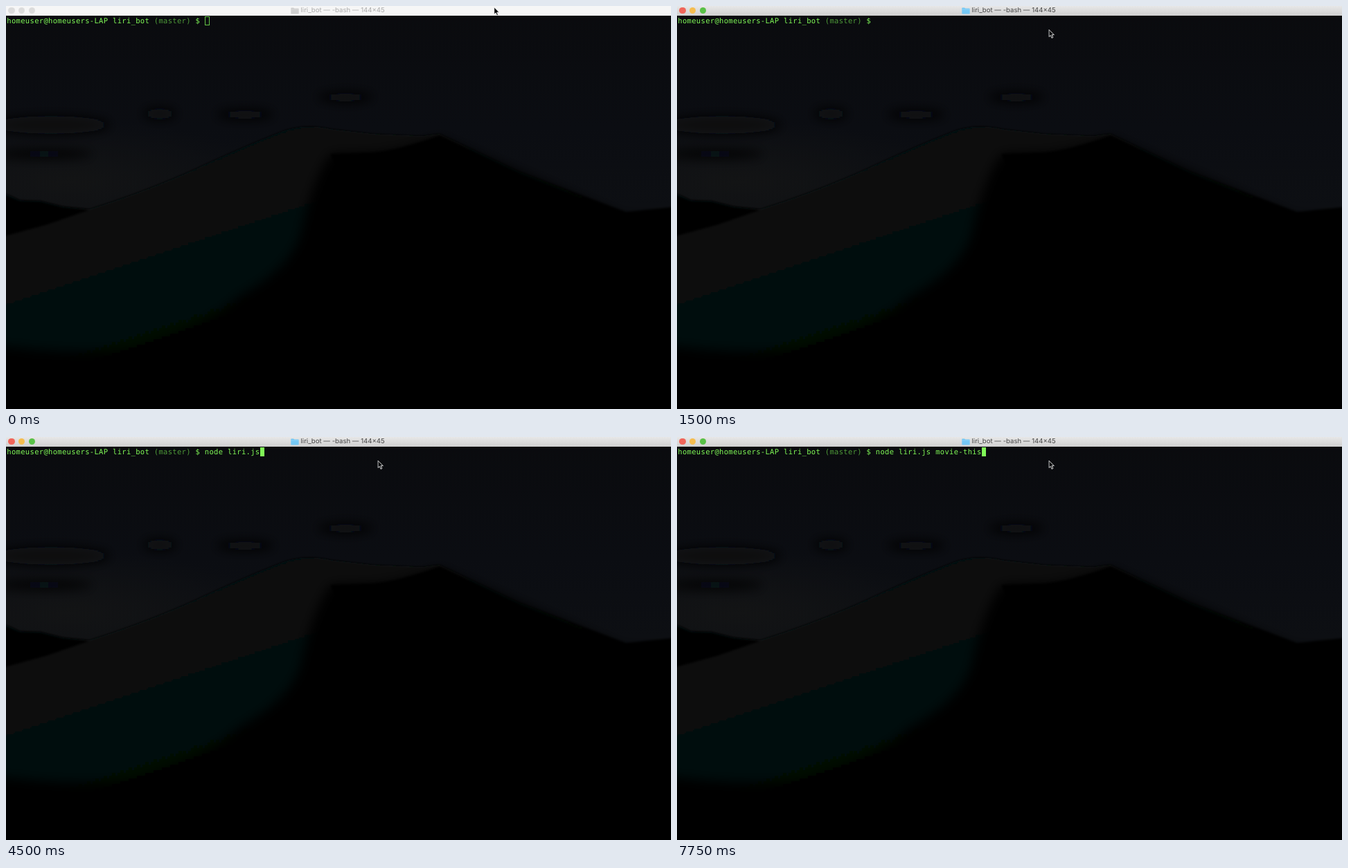
Animation, 960 px wide and 583 px high, one loop 8000 ms. Source, as an HTML page:

```html
<!DOCTYPE html>
<html lang="en">
<head>
<meta charset="utf-8">
<title>Terminal</title>
<style>
  html, body { margin: 0; width: 100%; height: 100%; overflow: hidden; background: #040406; }
  #stage { position: relative; width: 960px; height: 583px; overflow: hidden; text-rendering: geometricPrecision; }
  #stage > * { position: absolute; }
  #hills { left: 0; top: 0; }

  #bar { left: 0; top: 0; width: 960px; height: 14.3px; background: linear-gradient(#e7e7e7, #d0d0d0); }
  #bar i { position: absolute; top: 2px; width: 9.4px; height: 9.4px; border-radius: 50%; }
  #bar i:nth-child(1) { left: 3.3px; background: #f0655a; }
  #bar i:nth-child(2) { left: 18px; background: #f5bd4f; }
  #bar i:nth-child(3) { left: 32.9px; background: #58c146; }
  #bar svg { position: absolute; left: 410.5px; top: 2px; color: #74c8f5; }
  #bar b { position: absolute; left: 425.5px; top: 0; color: #454545; white-space: pre;
    font: 400 9.6px/14px Inter, "Liberation Sans", sans-serif; }
  .idle #bar { background: #f6f6f6; }
  .idle #bar i { background: #dcdcdc; }
  .idle #bar svg { color: #cfcfcf; }
  .idle #bar b { color: #ababab; }

  #line { left: 1.3px; top: 15.6px; white-space: pre; color: #80f957;
    font: 10.5px/13px "DejaVu Sans Mono", monospace; letter-spacing: calc(6.64px - 1ch); }
  #line em { font-style: normal; color: #4f9b39; }
  #caret { top: 15.4px; width: 6.7px; height: 12.6px; background: #80f957; }
  .idle #caret { box-sizing: border-box; background: none; border: 1px solid #64c446; }
  #mouse { left: 0; top: 0; }
</style>
</head>
<body>
<div id="stage" class="idle">
  <svg id="hills" width="960" height="583">
    <defs>
      <linearGradient id="sky" x1="0" y1="0" x2="0" y2="1">
        <stop offset="0" stop-color="#0a0b0e"/>
        <stop offset=".3" stop-color="#0b0d12"/>
        <stop offset=".5" stop-color="#0d0f13"/>
      </linearGradient>
      <linearGradient id="slope" gradientUnits="userSpaceOnUse" x1="190" y1="240" x2="270" y2="480">
        <stop offset="0" stop-color="#060708"/>
        <stop offset=".2" stop-color="#070a08"/>
        <stop offset=".32" stop-color="#090d09"/>
        <stop offset=".5" stop-color="#060807"/>
        <stop offset="1" stop-color="#050606"/>
      </linearGradient>
      <radialGradient id="glow">
        <stop offset="0" stop-color="#131415"/>
        <stop offset="1" stop-color="#131415" stop-opacity="0"/>
      </radialGradient>
      <filter id="soft" x="-20%" y="-20%" width="140%" height="140%"><feGaussianBlur stdDeviation="1.5"/></filter>
      <filter id="hazy" x="-50%" y="-100%" width="200%" height="300%"><feGaussianBlur stdDeviation="8"/></filter>
    </defs>
    <rect width="960" height="583" fill="url(#sky)"/>
    <ellipse cx="90" cy="255" rx="300" ry="90" fill="url(#glow)"/>
    <g fill="#07080b" filter="url(#hazy)">
      <ellipse cx="222" cy="156" rx="24" ry="8"/>
      <ellipse cx="345" cy="157" rx="42" ry="7"/>
      <ellipse cx="65" cy="172" rx="85" ry="13"/>
      <ellipse cx="55" cy="214" rx="70" ry="6"/>
      <ellipse cx="490" cy="132" rx="40" ry="7"/>
    </g>
    <g filter="url(#soft)">
      <path fill="url(#slope)" d="M-10 268L8 275 20 281 50 282 82 290 120 294Q200 269 275 235 350 200 405 179
        Q435 170 470 178L530 185 600 188 626 185 740 239 895 298 970 290V600H-10Z"/>
    </g>
    <path fill="#040406" filter="url(#hazy)" d="M626 190Q570 210 530 212L468 214Q440 255 425 330 410 380 335 420
      290 465 180 497 80 505-30 488V620H1000V305H895Z"/>
    <path fill="#040406" filter="url(#soft)" d="M626 187Q570 208 530 212L468 214 520 330 895 303 740 242Z"/>
    <path fill="#040506" filter="url(#soft)" d="M-10 270L20 282 50 283 82 291 120 295 60 316-10 335Z"/>
  </svg>

  <div id="bar"><i></i><i></i><i></i>
    <svg width="12" height="10" fill="currentColor"><path d="M.3 1Q.3.4 1 .4H4L5.2 1.5H11Q11.7 1.5 11.7 2.2V8.7Q11.7 9.4 11 9.4H1Q.3 9.4.3 8.7Z"/><path d="M.5 3H11.5" stroke="#fff" stroke-opacity=".35" stroke-width=".6"/></svg>
    <b>liri_bot — -bash — 144×45</b>
  </div>
  <div id="line">homeuser@homeusers-LAP liri_bot <em>(master)</em> $ <span id="typed"></span></div>
  <div id="caret"></div>
  <svg id="mouse" width="12" height="17"><path d="M.7.8V11L3 8.9 4.7 12.8 6.5 12 4.8 8.2H8Z" fill="#08090b" stroke="#f4f4f4" stroke-width=".9" stroke-linejoin="round"/></svg>
</div>
<script>
  const LOOP = 8000, CELL = 6.64, PROMPT_END = 286.9;
  const command = "node liri.js movie-this";
  // [time, characters typed]
  const keys = [[0, 0], [1750, 2], [2000, 4], [2250, 6], [2500, 7], [3000, 6], [3250, 9], [3750, 10],
    [4500, 12], [4750, 13], [5750, 15], [6000, 17], [6250, 19], [6500, 20], [7000, 21], [7250, 22], [7750, 23]];
  // [time, caret shown]
  const blinks = [[0, true], [500, false], [1000, true], [1500, false], [1750, true], [5500, false], [5750, true]];
  const moves = [[0, [704, 1]], [250, [558, 40.5]], [1250, [536.3, 33.5]]];

  const $ = id => document.getElementById(id);
  const at = (track, t) => track.findLast(([start]) => start <= t)[1];

  function draw(t) {
    const count = at(keys, t);
    const typo = t >= 2500 && t < 3000;
    const [x, y] = at(moves, t);
    $("stage").classList.toggle("idle", t < 500);
    $("typed").textContent = typo ? "node lr" : command.slice(0, count);
    $("caret").style.left = PROMPT_END + count * CELL + "px";
    $("caret").style.visibility = at(blinks, t) ? "visible" : "hidden";
    $("mouse").style.transform = `translate(${x}px, ${y}px)`;
  }

  let begin;
  function tick(now) {
    begin ??= now;
    draw((now - begin) % LOOP);
    requestAnimationFrame(tick);
  }
  draw(0);
  requestAnimationFrame(tick);
</script>
</body>
</html>
```
